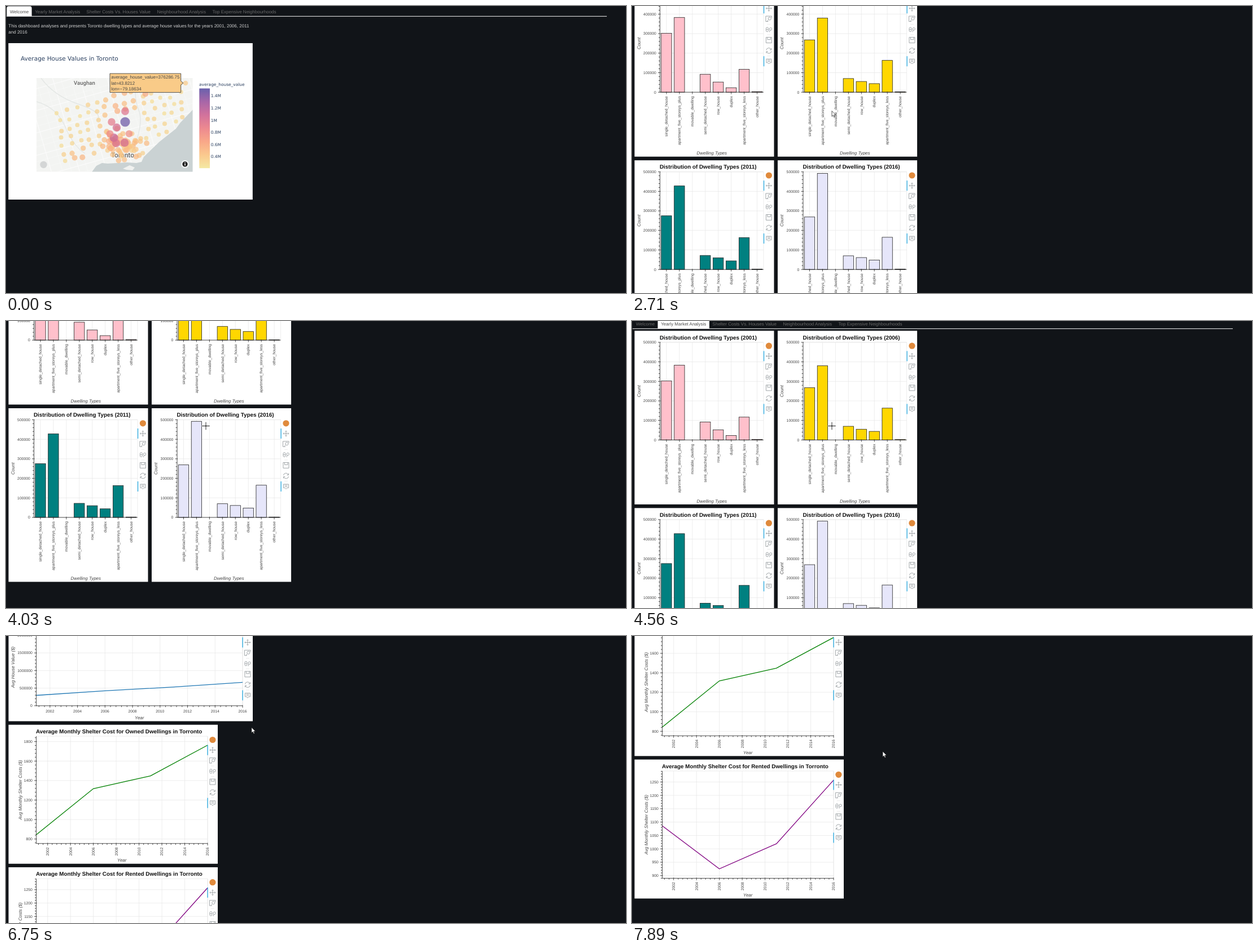
An HTML page that plays this animation: 1098 px wide and 510 px high, repeating every 8000 ms.

```html
<!DOCTYPE html>
<html lang="en">
<head>
<meta charset="utf-8">
<title>Toronto housing dashboard</title>
<style>
  html, body { margin: 0; width: 100%; height: 100%; overflow: hidden; background: #111418; }
  svg { display: block; width: 1098px; height: 510px; font-family: "Liberation Sans", Arial, sans-serif; text-rendering: geometricPrecision; }
  .plotly { font-family: "DejaVu Sans", Verdana, sans-serif; fill: #2a3f5f; }
  .place { font-family: Roboto, sans-serif; font-weight: 500; fill: #666; text-anchor: middle; }
  .icon { fill: none; stroke: #a1a6a9; stroke-width: 1; }
</style>
</head>
<body>
<svg id="stage" viewBox="0 0 1098 510"></svg>
<script>
const LOOP = 8000;
const stage = document.getElementById('stage');

const text = (x, y, s, size, attrs = '') => `<text x="${x}" y="${y}" font-size="${size}" ${attrs}>${s}</text>`;
const upText = (x, y, s, size, attrs) => `<g transform="translate(${x} ${y}) rotate(-90)">${text(0, 0, s, size, attrs)}</g>`;
const rect = (x, y, w, h, fill, attrs = '') => `<rect x="${x}" y="${y}" width="${w}" height="${h}" fill="${fill}" ${attrs}/>`;
const circle = (x, y, r, fill, attrs = '') => `<circle cx="${x}" cy="${y}" r="${r}" fill="${fill}" ${attrs}/>`;
const path = (d, stroke, width) => `<path d="${d}" fill="none" stroke="${stroke}" stroke-width="${width}"/>`;
const END = 'text-anchor="end" fill="#444"', MID = 'text-anchor="middle" fill="#444"';
const ITALIC = MID + ' font-style="italic"';

function random(seed) {
  return () => (seed = seed * 16807 % 2147483647) / 2147483647;
}

// ---- tabs ----
const tabNames = ['Welcome', 'Yearly Market Analysis', 'Shelter Costs Vs. Houses Value',
  'Neighbourhood Analysis', 'Top Expensive Neighbourhoods'];
const tabEdges = [1.3, 45.6, 137, 262, 360, 484];
const tabBar = rect(1, 17.8, 1063, 1, '#f4f4f4') + tabNames.map((name, i) => {
  const l = tabEdges[i], r = tabEdges[i + 1];
  return `<path id="tab${i}" d="M${l} 18V4Q${l} .5 ${l + 3} .5H${r - 3}Q${r} .5 ${r} 4V18Z"/>` +
    text(l + 5.6, 12.6, name, 8, `id="label${i}"`);
}).join('');

// ---- charts ----
const plots = [[], [], []];

// Pan, box zoom, wheel zoom, save, reset, hover.
const icons = [
  'M-5 0H5M0-5V5M-3.5-1.5L-5 0L-3.5 1.5M3.5-1.5L5 0L3.5 1.5M-1.5-3.5L0-5L1.5-3.5M-1.5 3.5L0 5L1.5 3.5',
  'M-1 4.5H-5.5V-5H5V-2M-3 4L-.8 1.6M-1.2-.6A2.6 2.6 0 1 0 4-.6A2.6 2.6 0 1 0-1.2-.6',
  'M-5-1.5A2 2.4 0 0 1-1-1.5V1.5A2 2.4 0 0 1-5 1.5ZM-5 0H-1M1-1A2.2 2.2 0 1 0 5.4-1A2.2 2.2 0 1 0 1-1M2 1L1 4.5',
  'M-5-5H5V5H-5ZM-2.5-5V-1H3V-5',
  'M-4.5-1A4.4 4.4 0 0 1 4-2M4.5 1A4.4 4.4 0 0 1-4 2M4.5-4.5V-1.5H1.5M-4.5 4.5V1.5H-1.5',
  'M-4.5-4H4.5V2.5H2L0 4.7L-2 2.5H-4.5ZM-2.5-2H2.5M-2.5 .4H2.5'];
function toolbar(x) {
  const at = i => 45 + i * 18.8;
  return circle(x, 26.8, 5.6, '#e08a3c') +
    icons.map((d, i) => `<path class="icon" d="${d}" transform="translate(${x} ${at(i)})"/>`).join('') +
    [1.5, 2.5, 4.5].map(i => path(`M${x - 3} ${at(i)}h6`, '#ddd', .6)).join('') +
    [0, 5].map(i => rect(x - 9.5, at(i) - 9, 1.3, 18, '#26aae1')).join('');
}

// Shared frame: panel, grid, y axis, titles; `draw` adds the x axis and the data.
function chart(page, c) {
  const { x, y, w, h, l, t, r, b, lo, hi, step } = c;
  plots[page].push([x + l, y + t, x + r, y + b]);
  const sy = v => b - (v - lo) / (hi - lo) * (b - t);
  let grid = '', axis = `M${l} ${t}V${b}H${r}`, labels = '';
  for (let k = Math.ceil(lo * 5 / step); k * step / 5 <= hi; k++) {
    const v = k * step / 5, p = sy(v);
    if (k % 5) { axis += `M${l - 2.4} ${p}H${l}`; continue; }
    grid += `M${l} ${p}H${r}`;
    axis += `M${l - 3.5} ${p}H${l + 1.1}`;
    labels += text(l - 6.7, p + 2.4, v, 6.8, END);
  }
  const part = c.draw(sy);
  return `<g transform="translate(${x} ${y})">` + rect(0, 0, w, h, '#fff') +
    path(grid + part.grid + `M${l} ${t}H${r}V${b}`, '#e5e5e5', .7) + part.data +
    path(axis + part.axis, '#222', .8) + labels + part.labels +
    text(l - .5, 15.2, c.title, 9.85, 'font-weight="bold" fill="#111"') +
    text((l + r) / 2, h - 3.3, c.xName, 8, ITALIC) +
    upText(c.nameX, (t + b) / 2, c.yName, 8, ITALIC) + toolbar(w - 9.1) + '</g>';
}

const dwellings = ['single_detached_house', 'apartment_five_storeys_plus', 'movable_dwelling', 'semi_detached_house',
  'row_house', 'duplex', 'apartment_five_storeys_less', 'other_house'];

function barChart(x, y, year, color, thousands) {
  const l = 45, r = 228.5, t = 20.5, b = 194, band = (r - l) / 8;
  return chart(1, { x, y, w: 247, h: 308.5, l, r, t, b, lo: 0, hi: 5e5, step: 1e5, nameX: 10.3,
    title: `Distribution of Dwelling Types (${year})`, xName: 'Dwelling Types', yName: 'Count',
    draw(sy) {
      let grid = '', axis = '', data = '', labels = '';
      thousands.forEach((v, i) => {
        const cx = l + band * (i + .5), top = sy(v * 1000);
        grid += `M${cx} ${t}V${b}`;
        axis += `M${cx} ${b - 1.1}v4.6`;
        data += rect(cx - band * .4, top, band * .8, b - top, color, 'stroke="#222" stroke-width=".8"');
        labels += upText(cx + 2.3, b + 7, dwellings[i], 6.8, END);
      });
      return { grid, axis, data, labels };
    } });
}

function lineChart(c, color, values, upright) {
  const { l, r, t, b } = c, sx = year => l + (year - 2001) / 15 * (r - l);
  return chart(2, { x: 4.5, xName: 'Year', ...c,
    draw(sy) {
      let grid = '', axis = '', labels = '';
      for (let k = -2; k <= 35; k++) {
        const year = 2002 + k * .4, cx = sx(year);
        if (k % 5) { axis += `M${cx} ${b}v2.4`; continue; }
        grid += `M${cx} ${t}V${b}`;
        axis += `M${cx} ${b - 1.1}v4.6`;
        labels += upright ? upText(cx + 2.4, b + 6.7, year, 6.8, END) : text(cx, b + 12, year, 6.8, MID);
      }
      const d = 'M' + values.map((v, i) => sx(2001 + i * 5) + ' ' + sy(v)).join('L');
      return { grid, axis, labels, data: path(d, color, 1.3) };
    } });
}

// ---- map ----
const sunset = ['#f3e79b', '#fac484', '#f8a07e', '#eb7f86', '#ce6693', '#a059a0', '#5c53a5'];
function sunsetAt(f) {
  const p = Math.max(0, Math.min(.9999, f)) * 6, i = Math.floor(p);
  const channel = k => {
    const [a, b] = [sunset[i], sunset[i + 1]].map(s => parseInt(s.substr(1 + 2 * k, 2), 16));
    return Math.round(a + (b - a) * (p - i));
  };
  return `rgb(${channel(0)},${channel(1)},${channel(2)})`;
}
// Value in millions sets both area and colour.
const bubble = (x, y, v) => circle(x.toFixed(1), y.toFixed(1), (7.1 * Math.sqrt(v)).toFixed(2),
  sunsetAt((v - .2) / 1.3), 'opacity=".7"');
const hill = (dx, dy) => Math.exp(-dx * dx - dy * dy);

function mapBubbles() {
  const rnd = random(77), onLand = (x, y) => y < Math.min(283, 512 - x);
  let s = '';
  // Suburbs: a loose grid tilted like the streets, dearer towards the central ridge and the west pocket.
  for (let row = 0; row < 7; row++) for (let col = 0; col < 15; col++) {
    const x = 93 + col * 16.3 + row * 2 + rnd() * 7 - 3.5;
    const y = 192 - (x - 92) * .31 + row * 15 + rnd() * 6 - 3;
    const central = Math.abs(x - 203) < 34 && y > 195;
    if (x > 324 || y < 134 || central || !onLand(x, y)) continue;
    s += bubble(x, y, .25 + rnd() * .08 + .22 * hill((x - 200) / 32, 0) + .3 * hill((x - 130) / 18, (y - 262) / 15));
  }
  // Downtown: a dense cluster above the harbour.
  for (let i = 0; i < 58; i++) {
    const x = 206 + (rnd() + rnd() - 1) * 52, y = 247 + (rnd() + rnd() - 1) * 34;
    if (onLand(x, y)) s += bubble(x, y, .32 + rnd() * .16 + .2 * hill((x - 195) / 16, (y - 240) / 16));
  }
  const dearest = [[211, 206, 1.46], [211, 187, .95], [196, 216, 1.02], [191, 234, 1.12], [210, 243, 1.05],
    [195, 244, 1], [187, 206, .9], [184, 227, .8], [218, 227, .76], [247, 156, .58], [318, 137, .376]];
  return s + dearest.map(p => bubble(...p)).join('');
}

function mapRoads() {
  const rnd = random(9);
  let major = '', minor = '';
  for (let i = 0; i < 22; i++) {
    const x = 30 + i * 16 + rnd() * 5, y = 150 + i * 13 + rnd() * 4;
    const road = `M${x} 120L${x + 52} 300M40 ${y}L340 ${y - 84}`;
    if (i % 3) minor += road; else major += road;
  }
  return path(minor, '#f8f9f8', .7) + path(major, '#fbfbfb', 1.2) +
    path('M54 170Q90 180 105 215T140 262M62 128Q85 160 130 175T160 205M232 128Q225 160 235 185T222 262', '#e4e7e5', 1.4);
}

const intro = 'This dashboard analyses and presents Toronto dwelling types and average house values for the years 2001, 2006, 2011';
const welcome = text(4.3, 37.8, intro, 8.03, 'fill="#d0d0d0"') + text(4.3, 48.8, 'and 2016', 8.03, 'fill="#d0d0d0"') +
  rect(4.3, 66, 432.5, 278, '#fff') + text(26, 97, 'Average House Values in Toronto', 10.55, 'class="plotly"') +
  `<clipPath id="mapClip">${rect(54, 128, 276.5, 166.5, '#000')}</clipPath><g clip-path="url(#mapClip)">` +
  rect(54, 128, 277, 167, '#f3f4f2') + mapRoads() +
  `<path fill="#cad2d3" d="M331 184L309 207L301 218L272 241L244 268L240 277L231 279L214 278L180 280L170 279L160 284L152 295H331Z"/>
   <path fill="#f0f1ef" d="M207 289L219 283L228 287L224 292L213 291Z"/>` +
  text(139, 140, 'Vaughan', 9.6, 'class="place"') + text(206.5, 269.4, 'Toronto', 12, 'class="place"') + mapBubbles() + '</g>' +
  circle(66.5, 282, 6.2, '#d4d6d6') + circle(317, 281, 7, '#fff', 'opacity=".7"') + circle(317, 281, 4.7, '#222') +
  rect(316.3, 280, 1.5, 3.6, '#fff') + circle(317, 278.4, .8, '#fff') +
  text(342, 141.6, 'average_house_value', 7.45, 'class="plotly"') +
  `<linearGradient id="scale" x1="0" y1="1" x2="0" y2="0">${sunset.map((c, i) => `<stop offset="${i / 6}" stop-color="${c}"/>`).join('')}</linearGradient>` +
  rect(342.3, 146.5, 18.7, 141.7, 'url(#scale)', 'opacity=".92"') +
  ['1.4M', '1.2M', '1M', '0.8M', '0.6M', '0.4M'].map((s, i) => text(362.8, 162.4 + i * 21.6, s, 7.4, 'class="plotly"')).join('') +
  `<g id="tooltip"><path d="M184 120H309.7V133.5L314 136.8L309.7 140.2V153.6H184Z" fill="#f9cb88" stroke="#444" stroke-width=".9"/>` +
  ['average_house_value=376286.75', 'lat=43.8212', 'lon=−79.18634'].map((s, i) => text(186.2, 129.4 + i * 10.3, s, 8, 'fill="#444"')).join('') + '</g>';

const yearly = barChart(4.5, 22, 2001, 'pink', [302, 383, 0, 92, 52, 23, 117, 3]) +
  barChart(258, 22, 2006, 'gold', [268, 380, 0, 70, 55, 44, 163, 2]) +
  barChart(4.5, 337, 2011, 'teal', [275, 428, 0, 72, 60, 44, 163, 2]) +
  barChart(258, 337, 2016, 'lavender', [269, 492, 0, 70, 61, 48, 165, 2]);

const monthly = { w: 370.5, h: 247, l: 49, r: 352.5, t: 20.4, b: 211, nameX: 23.2, yName: 'Avg Monthly Shelter Costs ($)' };
const shelter = lineChart({ y: 22, w: 432.5, h: 185, l: 49, r: 414.5, t: 20.5, b: 157.5, lo: 0, hi: 2.19e6, step: 5e5, nameX: 10.4,
    title: 'Average House Value in Toronto', yName: 'Avg House Value ($)' }, '#1f77b4', [294e3, 424e3, 531e3, 663e3]) +
  lineChart({ ...monthly, y: 213.3, lo: 754, hi: 1855, step: 200,
    title: 'Average Monthly Shelter Cost for Owned Dwellings in Torronto' }, 'green', [843, 1317, 1448, 1763], true) +
  lineChart({ ...monthly, y: 466.5, lo: 890, hi: 1291, step: 50,
    title: 'Average Monthly Shelter Cost for Rented Dwellings in Torronto' }, 'purple', [1086, 925, 1019, 1257], true);

stage.innerHTML = rect(0, 0, 1098, 510, '#111418') + `<g id="scroller">${tabBar}` +
  [welcome, yearly, shelter].map((s, i) => `<g id="page${i}">${s}</g>`).join('') + '</g><path id="cursor"/>';

// ---- motion ----
const el = id => document.getElementById(id);
const show = (id, on) => el(id).setAttribute('display', on ? 'inline' : 'none');
const ease = p => { p = Math.max(0, Math.min(1, p)); return p * p * (3 - 2 * p); };

// Distance scrolled by `count` wheel notches, one every `gap` ms.
function wheel(t, start, gap, count) {
  let y = 0;
  for (let i = 0; i < count; i++) y += 62.8 * ease((t - start - i * gap) / 90);
  return y;
}
const scrollAt = t => t < 5820
  ? Math.max(0, Math.min(182, wheel(t, 2600, 338, 3)) - wheel(t, 4095, 200, 3))
  : Math.min(247, wheel(t, 6680, 265, 4));

// Each leg: start, end, x and y reached.
const legs = [[440, 1170, 42, 26], [1310, 1440, 90, 2], [1710, 2500, 354, 186.5], [4890, 5250, 440, 85],
  [5250, 5690, 214, 9], [6020, 6600, 434, 160], [6600, 7090, 438, 170.5], [7220, 7690, 444, 205]];
const cursorAt = t => legs.reduce(([x, y], [from, to, nx, ny]) => {
  const p = ease((t - from) / (to - from));
  return [x + (nx - x) * p, y + (ny - y) * p];
}, [428, 506]);

const cursors = {
  arrow: ['M0 0V9.8L2.2 7.7L3.8 11.3L5.4 10.6L3.8 7.1H6.9Z', '#fff', '#111'],
  hand: ['M-1.2 1Q0-.8 1.2 1V5Q2.4 4.4 3.2 5.6Q4.4 5 5 6.2Q6.6 5.8 6.8 7.5V10Q6.6 11.5 5.6 13.5H.4Q-1 11-3 8.2Q-2.8 6.6-1.2 8.2Z', '#fff', '#111'],
  cross: ['M-7-.8H-.8V-7H.8V-.8H7V.8H.8V7H-.8V.8H-7Z', '#000', '#fff']
};

function render(t) {
  const page = t < 1710 ? 0 : t < 5820 ? 1 : 2, scroll = scrollAt(t);
  const [x, y] = cursorAt(t), py = y + scroll;
  const hover = py < 18 ? tabNames.findIndex((_, i) => x >= tabEdges[i] && x < tabEdges[i + 1]) : -1;
  tabNames.forEach((_, i) => {
    el('tab' + i).setAttribute('fill', i === page ? '#fff' : i === hover ? '#f2f2f2' : 'none');
    el('label' + i).setAttribute('fill', i === page ? '#4d4d4d' : '#6a6a6a');
  });
  for (let i = 0; i < 3; i++) show('page' + i, i === page);
  show('tooltip', t < 440);
  el('scroller').setAttribute('transform', `translate(0 ${-scroll})`);

  const overPlot = plots[page].some(([l, top, r, b]) => x > l && x < r && py > top && py < b);
  const [d, fill, stroke] = cursors[hover >= 0 ? 'hand' : overPlot ? 'cross' : 'arrow'];
  const attrs = { d, fill, stroke, 'stroke-width': .7, transform: `translate(${x} ${y})` };
  for (const k in attrs) el('cursor').setAttribute(k, attrs[k]);
  show('cursor', t >= 440);
}

const begin = performance.now();
function tick() {
  render((performance.now() - begin) % LOOP);
  requestAnimationFrame(tick);
}
tick();
</script>
</body>
</html>
```
